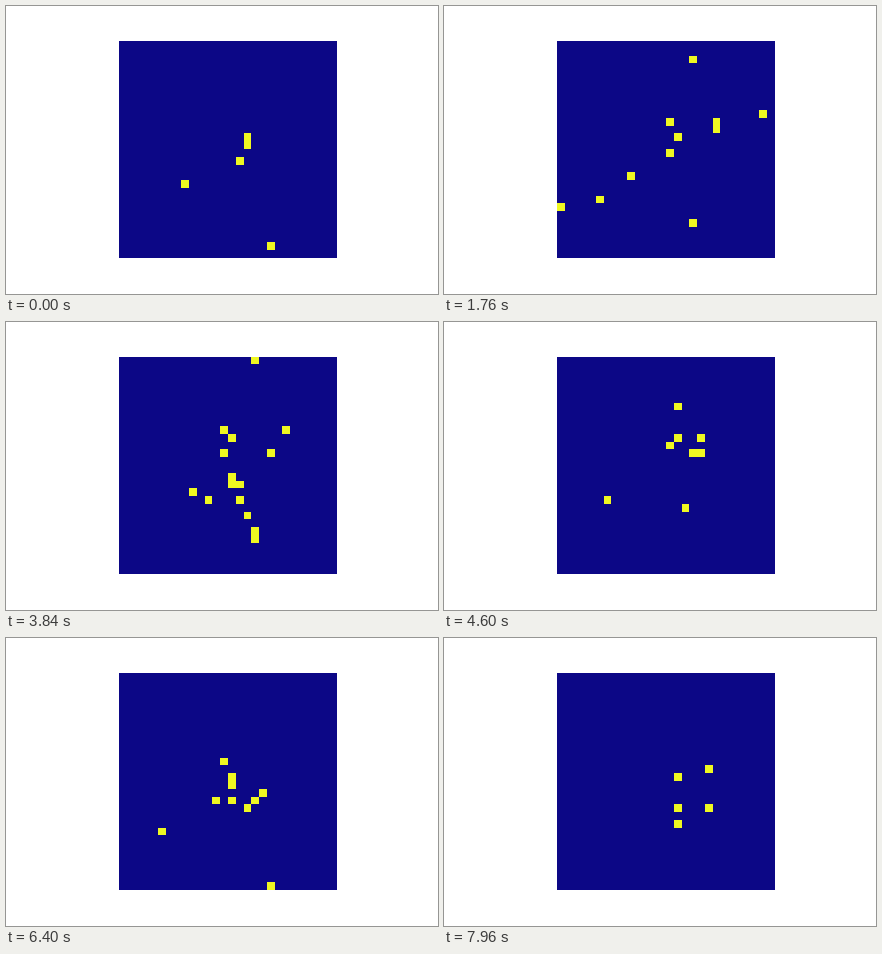
Recreate the animation shown at these times as a matplotlib script. Size 432 px wide and 288 px high, loop 8 s.

```python
import numpy as np
import matplotlib.pyplot as plt
from matplotlib.animation import FuncAnimation

SIZE = 28
FRAMES = 200
INTERVAL = 40
MEAN_SPIKES = 9.7  # average lit cells per step
STROKE_WIDTH = 1.1
FADE = 8.5  # strokes weaken away from the centre

# Brush strokes of the glyph as (column, row) key points
SWEEP = [(0, 23), (7, 18.5), (12, 15), (19, 11.5), (27, 7)]
HOOK = [(19, 11.5), (20, 13.5), (16, 17.5), (14, 16)]
DOWN = [(13, 8), (15, 16), (19, 27)]
TICK = [(16, 0), (16, 7)]

y, x = np.mgrid[:SIZE, :SIZE]


def segment_distance(start, end):
    """Distance of every cell to a straight segment."""
    (x0, y0), (x1, y1) = start, end
    dx, dy = x1 - x0, y1 - y0
    t = np.clip(((x - x0) * dx + (y - y0) * dy) / (dx**2 + dy**2), 0, 1)
    return np.hypot(x - x0 - t * dx, y - y0 - t * dy)


def firing_rate():
    """Spike probability of every cell."""
    distance = np.min([segment_distance(a, b)
                       for stroke in (SWEEP, HOOK, DOWN, TICK)
                       for a, b in zip(stroke, stroke[1:])], axis=0)
    radius = np.hypot(x - 15, y - 15)
    rate = np.exp(-(distance / STROKE_WIDTH)**2 / 2 - (radius / FADE)**2 / 2)
    return rate * MEAN_SPIKES / rate.sum()


rng = np.random.default_rng(7)
spikes = (rng.random((FRAMES, SIZE, SIZE)) < firing_rate()).astype(float)

fig, ax = plt.subplots(figsize=(6, 4), dpi=72, facecolor="white")
fig.subplots_adjust(left=0.125, right=0.9, bottom=0.125, top=0.88)
ax.axis("off")
image = ax.imshow(spikes[0], cmap="plasma", vmin=0, vmax=1,
                  interpolation="nearest")


def update(step):
    image.set_data(spikes[step])
    return [image]


anim = FuncAnimation(fig, update, frames=FRAMES, interval=INTERVAL,
                     repeat=True, repeat_delay=0)
plt.show()
```
